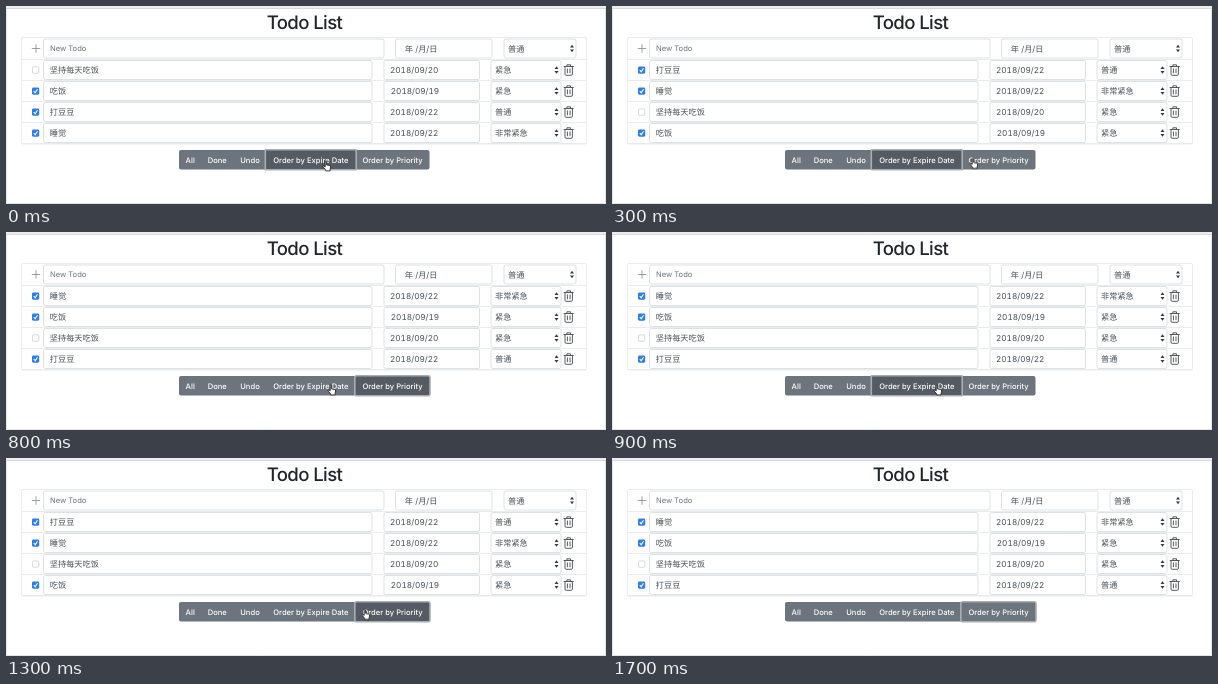
These frames come from a looping animation (600 px wide and 198 px high, 1800 ms). An HTML page:

```html
<!DOCTYPE html>
<html lang="zh">
<head>
<meta charset="utf-8">
<title>Todo List</title>
<style>
  html, body { margin: 0; width: 100%; height: 100%; overflow: hidden; background: #fff; }
  svg { display: block; width: 600px; height: 198px; }
  text {
    font: 8.2px Inter, "Noto Sans CJK SC", "Noto Sans CJK", sans-serif;
    font-variant-numeric: tabular-nums;
    text-rendering: geometricPrecision;
    fill: #495057;
  }
  .title { font-size: 18.6px; font-weight: 500; letter-spacing: -.62px; fill: #212529; text-anchor: middle; }
  .hint { font-size: 7.6px; fill: #6c757d; }
  .buttons text { font-size: 7.6px; font-weight: 500; fill: #fff; text-anchor: middle; }
  .field { fill: #fff; stroke: #d5dade; stroke-width: .8; }
  .line { fill: none; stroke: #e6e8ea; stroke-width: .8; }
  .focus { fill: #545b62; stroke: #a9aeb1; stroke-width: 1.6; }

  /* Hard cuts only: every part jumps between its poses. */
  .task, .focus, .cursor { animation: 1.8s step-end infinite; }
  .persist { animation-name: persist; }
  .eat { animation-name: eat; }
  .play { animation-name: play; }
  .sleep { animation-name: sleep; }
  .by-date { animation-name: by-date; }
  .by-priority { animation-name: by-priority; }
  .cursor { animation-name: cursor; }

  @keyframes persist {
    0% { transform: translateY(64px); }
    5.5%, 100% { transform: translateY(106px); }
  }
  @keyframes eat {
    0%, 33.3%, 83.3%, 100% { transform: translateY(85px); }
    5.5%, 55.5% { transform: translateY(127px); }
  }
  @keyframes play {
    0% { transform: translateY(106px); }
    5.5%, 55.5% { transform: translateY(64px); }
    33.3%, 83.3%, 100% { transform: translateY(127px); }
  }
  @keyframes sleep {
    0% { transform: translateY(127px); }
    5.5%, 55.5% { transform: translateY(85px); }
    33.3%, 83.3%, 100% { transform: translateY(64px); }
  }
  @keyframes by-date {
    0%, 49.9% { opacity: 1; }
    22.2%, 72.2%, 100% { opacity: 0; }
  }
  @keyframes by-priority {
    0%, 49.9% { opacity: 0; fill: #545b62; }
    22.2%, 72.2% { opacity: 1; fill: #545b62; }
    88.8%, 100% { opacity: 1; fill: #6c757d; }
  }
  @keyframes cursor {
    0% { transform: translate(321px, 160px); }
    5.5% { transform: translate(338px, 159px); }
    11.1% { transform: translate(361px, 158px); }
    16.6% { transform: translate(362px, 157.5px); }
    38.8% { transform: translate(345px, 157.5px); }
    44.4% { transform: translate(326px, 158px); }
    55.5% { transform: translate(331px, 158px); }
    61.1% { transform: translate(359px, 157px); }
    66.6% { transform: translate(361px, 163px); }
    72.2% { transform: translate(360px, 156.5px); visibility: visible; }
    88.8%, 100% { transform: translate(360px, 156.5px); visibility: hidden; }
  }
</style>
</head>
<body>
<svg viewBox="0 0 600 198">
  <defs>
    <path id="arrows" d="M-2-.9L0-3.7 2-.9zM-2 .9L0 3.7 2 .9z" fill="#343a40"/>
    <g id="trash" fill="none" stroke="#45494d" stroke-width=".9">
      <path d="M-5-3.5H5M-1.8-3.6V-5.2H1.8V-3.6M-3.7-3.4V4.2Q-3.7 5.3-2.6 5.3H2.6Q3.7 5.3 3.7 4.2V-3.4"/>
      <path d="M-1.3-1.5V3.2M1.3-1.5V3.2"/>
    </g>
    <g id="unchecked">
      <rect x="26.4" y="-3.1" width="6.4" height="6.4" rx="1.2" fill="#fff" stroke="#c9c9c9" stroke-width=".7"/>
    </g>
    <g id="checked">
      <rect x="26" y="-3.5" width="7.2" height="7.2" rx="1.4" fill="#2b7fea"/>
      <path d="M27.8.2L29.2 1.8 31.5-1.8" fill="none" stroke="#fff" stroke-width="1.1"/>
    </g>
    <g id="row">
      <rect class="field" x="37.5" y="-9.5" width="328.5" height="19" rx="2"/>
      <rect class="field" x="378" y="-9.5" width="95.5" height="19" rx="1.5"/>
      <rect class="field" x="485" y="-9.5" width="70" height="19" rx="2"/>
      <use href="#arrows" x="550.5"/>
      <use href="#trash" x="562.7"/>
      <path class="line" d="M15.5 10.5H580.5"/>
    </g>
  </defs>

  <rect width="600" height="198" fill="#fff"/>
  <rect width="600" height="2.6" fill="#ededed"/>
  <path d="M0 2.5H600" stroke="#d9d9d9"/>
  <path d="M.5 3V197.5H599.5V3" fill="none" stroke="#e4e4e4"/>

  <text class="title" x="298.5" y="23.3">Todo List</text>

  <rect class="line" x="15.5" y="31.5" width="565" height="106.5" rx="1.5"/>
  <path class="line" d="M15.5 53.5H580.5"/>
  <path d="M25.8 42.5H34.2M30 38.3V46.7" stroke="#85898d" stroke-width=".8"/>
  <rect class="field" x="37.5" y="33" width="340.5" height="19" rx="2"/>
  <rect class="field" x="389.5" y="33" width="96.5" height="19" rx="1.5"/>
  <rect class="field" x="498" y="33" width="72" height="19" rx="2"/>
  <text class="hint" x="44" y="45.4">New Todo</text>
  <text x="398.8" y="45.6">年 /月/日</text>
  <text x="502" y="45.6">普通</text>
  <use href="#arrows" x="566" y="42.5"/>

  <use href="#row" y="64"/>
  <use href="#row" y="85"/>
  <use href="#row" y="106"/>
  <use href="#row" y="127"/>

  <g class="task persist">
    <use href="#unchecked"/>
    <text x="43.8" y="3.1">坚持每天吃饭</text>
    <text x="384" y="3">2018/09/20</text>
    <text x="489" y="3.1">紧急</text>
  </g>
  <g class="task eat">
    <use href="#checked"/>
    <text x="43.8" y="3.1">吃饭</text>
    <text x="384.8" y="3">2018/09/19</text>
    <text x="489" y="3.1">紧急</text>
  </g>
  <g class="task play">
    <use href="#checked"/>
    <text x="43.8" y="3.1">打豆豆</text>
    <text x="384" y="3">2018/09/22</text>
    <text x="489" y="3.1">普通</text>
  </g>
  <g class="task sleep">
    <use href="#checked"/>
    <text x="43.8" y="3.1">睡觉</text>
    <text x="384" y="3">2018/09/22</text>
    <text x="489" y="3.1">非常紧急</text>
  </g>

  <g class="buttons">
    <rect x="173" y="144" width="250.5" height="19.5" rx="2" fill="#6c757d"/>
    <rect class="focus by-date" x="259.3" y="143.7" width="90.9" height="20" rx=".5"/>
    <rect class="focus by-priority" x="348.8" y="143.7" width="75.2" height="20" rx="2"/>
    <text x="184.2" y="156.6">All</text>
    <text x="211.3" y="156.6">Done</text>
    <text x="244" y="156.6">Undo</text>
    <text x="304.9" y="156.6">Order by Expire Date</text>
    <text x="386.5" y="156.6">Order by Priority</text>
  </g>

  <path class="cursor" fill="#fff" stroke="#111" stroke-width=".8" stroke-linejoin="round"
    d="M-1.8-4.2Q-1.8-5-1.1-5T-.4-4.2V-1.1L2.3-.6Q3.8-.3 3.7 1L3.1 3.4V4.9H-1.3V3.9L-3.9.9Q-4.4-.2-3.3-.3L-1.8.9Z"/>
</svg>
</body>
</html>
```
